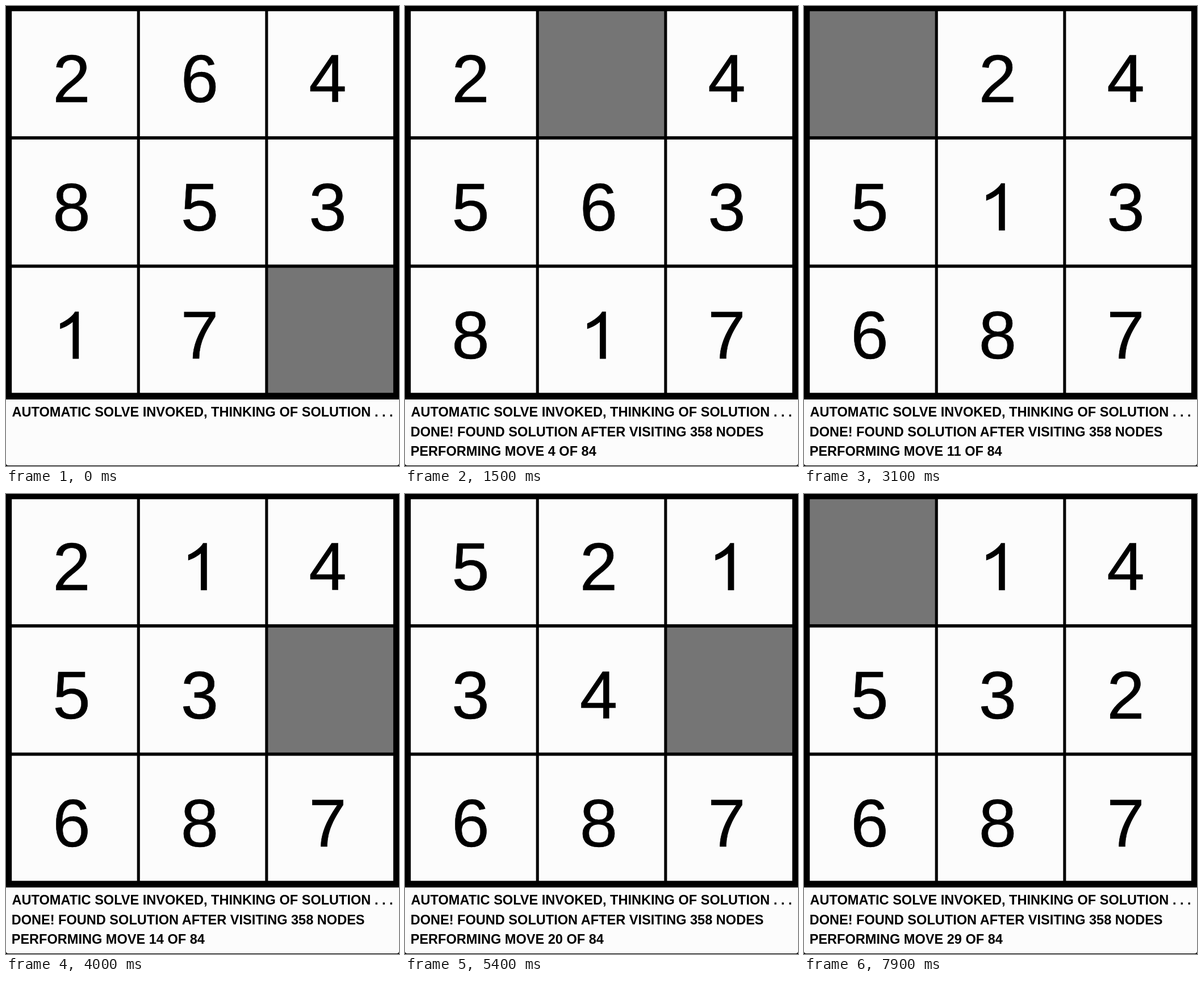
These frames come from a looping animation (692 by 809 pixels, 8000 ms). An HTML page:

```html
<!DOCTYPE html>
<html lang="en">
<head>
<meta charset="utf-8">
<title>Sliding puzzle</title>
<style>
  html, body { margin: 0; width: 100%; height: 100%; overflow: hidden; background: #000; }
  svg { display: block; width: 692px; height: 809px; }
  text { font-family: "Liberation Sans", Arial, sans-serif; font-kerning: normal; }
  .digit { font-size: 119.5px; text-anchor: middle; stroke: #000; stroke-width: 0.6; }
  .note { font-size: 23.55px; font-weight: bold; }
</style>
</head>
<body>
<svg id="stage" viewBox="0 0 692 809">
  <path d="M0 692H692V804Q692 808 688 808H4Q0 808 0 804Z" fill="#fcfcfc"/>
  <g id="board"></g>
  <text class="note" x="10.5" y="722">AUTOMATIC SOLVE INVOKED, THINKING OF SOLUTION . . .</text>
  <text class="note" x="9.7" y="756.7" id="found">DONE! FOUND SOLUTION AFTER VISITING 358 NODES</text>
  <text class="note" x="9.7" y="791.4" id="move"></text>
</svg>
<script>
const LOOP = 8000, TICK = 100;
const FIRST_MOVE = 280, MOVE_GAP = 255;
const PITCH = 225.6, CELL_W = 220.5, CELL_H = 219.9;
const START = "26485317_";
// Cells the gap visits, one per move
const GAP_PATH = "763410347630145210345214521430";
// Footless numeral one, drawn from its baseline
const ONE = "M118 0H107.2V-64.7C101.5 -59.5 92.5 -54.8 85 -52.4V-62.2" +
            "C97 -67.6 107.6 -76 111.2 -83H118Z";

const board = document.getElementById("board");
const found = document.getElementById("found");
const move = document.getElementById("move");

function add(parent, name, attrs, text) {
  const el = document.createElementNS("http://www.w3.org/2000/svg", name);
  for (const key in attrs) el.setAttribute(key, attrs[key]);
  if (text) el.textContent = text;
  return parent.appendChild(el);
}

function makeTile(label) {
  const g = add(board, "g", {});
  add(g, "rect", { width: CELL_W, height: CELL_H, fill: label === "_" ? "#757575" : "#fcfcfc" });
  if (label === "1") {
    add(g, "path", { d: ONE, transform: "translate(0 160)", role: "img", "aria-label": "1" });
  } else if (label !== "_") {
    add(g, "text", { class: "digit", x: 105.2, y: 160 }, label);
  }
  return g;
}

const tiles = {};
for (const label of START) tiles[label] = makeTile(label);

// Every board position, from the start to the last move
const states = [START];
for (const step of GAP_PATH) {
  const cells = [...states[states.length - 1]];
  const gap = cells.indexOf("_");
  cells[gap] = cells[step];
  cells[step] = "_";
  states.push(cells.join(""));
}

let shown = -1;
function show(count) {
  if (count === shown) return;
  shown = count;
  [...states[count]].forEach((label, i) => {
    const x = 10.2 + (i % 3) * PITCH, y = 9.2 + Math.floor(i / 3) * PITCH;
    tiles[label].setAttribute("transform", `translate(${x} ${y})`);
  });
  found.setAttribute("visibility", count ? "visible" : "hidden");
  move.textContent = count ? `PERFORMING MOVE ${count - 1} OF 84` : "";
}

const begin = performance.now();
function frame(now) {
  const t = Math.floor((Math.max(0, now - begin) % LOOP) / TICK) * TICK;
  const count = Math.floor((t - FIRST_MOVE) / MOVE_GAP) + 1;
  show(Math.min(GAP_PATH.length, Math.max(0, count)));
  requestAnimationFrame(frame);
}
show(0);
requestAnimationFrame(frame);
</script>
</body>
</html>
```
